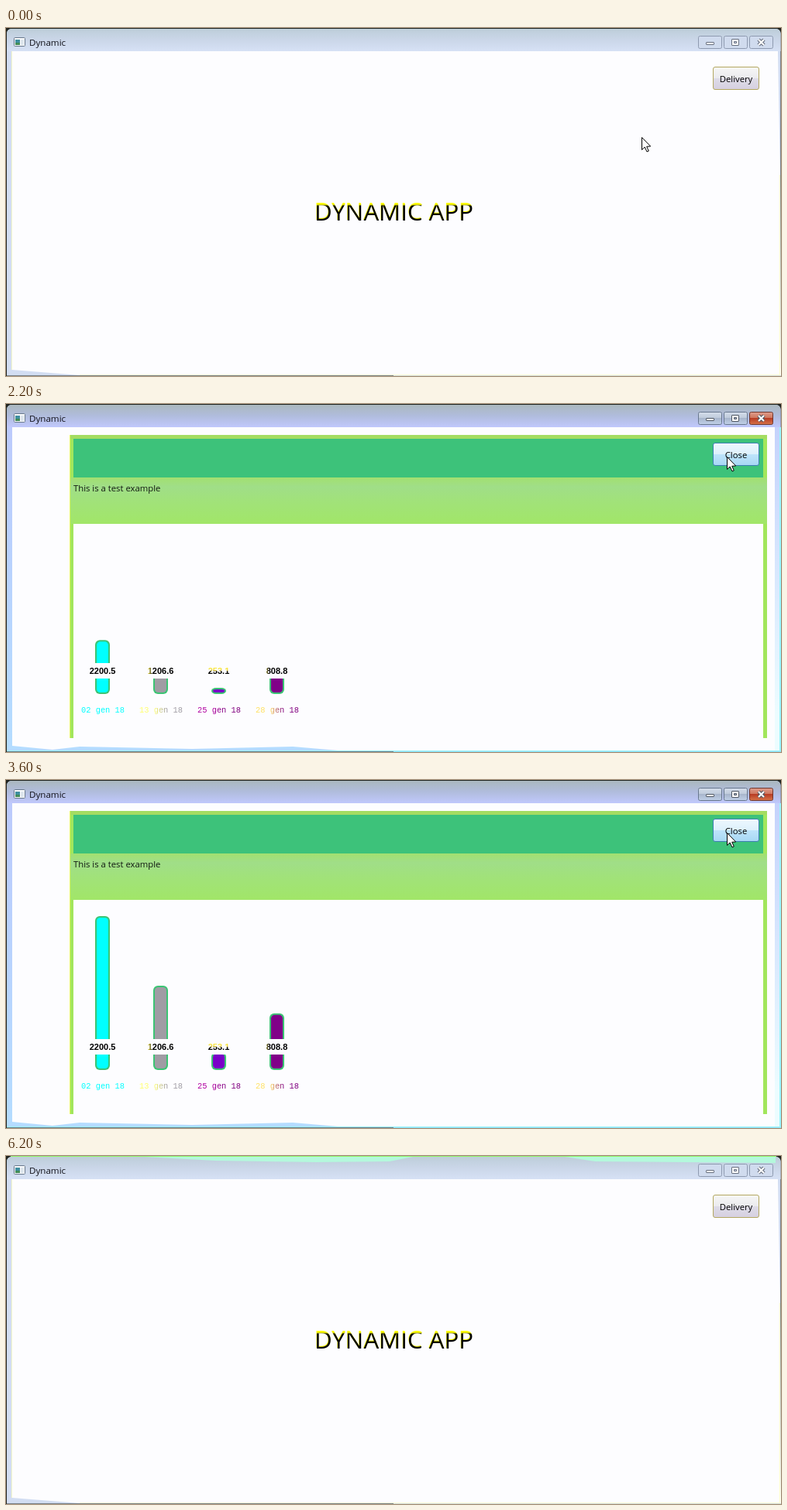
These frames come from a looping animation (1000 by 450 pixels, 6.57 s). An HTML page with a canvas:

```html
<!DOCTYPE html>
<html lang="en">
<head>
<meta charset="utf-8">
<title>Dynamic</title>
<style>
html, body { margin: 0; width: 100%; height: 100%; overflow: hidden; background: #fdfdff; }
canvas { display: block; width: 1000px; height: 450px; }
</style>
</head>
<body>
<canvas id="stage" width="1000" height="450"></canvas>
<script>
const ctx = document.getElementById('stage').getContext('2d');
const LOOP = 6570;
const UI = '"Open Sans", "Noto Sans", sans-serif';
const WHITE = '#fdfdff';
const PANEL = { left: 82, right: 982, top: 40, bottom: 432 };
const BAR_BASE = 375;
const BARS = [
  { value: 2200.5, date: '02 gen 18', early: ['#7444b0', '#fff4a0'], fill: '#00ffff', ink: ['#00ffff', '#00ffff'] },
  { value: 1206.6, date: '13 gen 18', early: ['#84ecb4', '#a0f0f4'], fill: '#a09ca4', ink: ['#ffff70', '#a09ca4'] },
  { value: 253.1, date: '25 gen 18', early: ['#70502c', '#70502c'], fill: '#7a00c8', ink: ['#b000a0', '#800080'] },
  { value: 808.8, date: '28 gen 18', early: ['#000080', '#202050'], fill: '#800088', ink: ['#ffe060', '#800080'] }
];

const clamp = x => Math.max(0, Math.min(1, x));

function rect(x, y, w, h, fill) {
  ctx.fillStyle = fill;
  ctx.fillRect(x, y, w, h);
}

function paint(fill, line) {
  ctx.fillStyle = fill;
  ctx.fill();
  if (!line) return;
  ctx.strokeStyle = line;
  ctx.lineWidth = 1;
  ctx.stroke();
}

function round(x, y, w, h, r, fill, line) {
  ctx.beginPath();
  ctx.roundRect(x, y, w, h, r);
  paint(fill, line);
}

function poly(points, fill, line) {
  ctx.beginPath();
  points.forEach(([x, y]) => ctx.lineTo(x, y));
  ctx.closePath();
  paint(fill, line);
}

function text(str, x, y, font, fill, align = 'left') {
  ctx.font = font;
  ctx.textAlign = align;
  ctx.fillStyle = fill;
  ctx.fillText(str, x, y);
}

function gradient(x0, y0, x1, y1, ...stops) {
  const g = ctx.createLinearGradient(x0, y0, x1, y1);
  stops.forEach(([at, color]) => g.addColorStop(at, color));
  return g;
}

function drawFrame(active, glow) {
  rect(0, 0, 1000, 450, '#20241f');
  rect(500, 440, 500, 10, active ? '#70e8f0' : '#d8dccc');
  round(1, 1, 998.5, 448.5, [6, 6, 0, 0], active
    ? gradient(0, 30, 0, 442, [0, '#bccafc'], [1, '#b4dcff'])
    : '#d2ddf2');
  round(1, 1, 998.5, 29, [6, 6, 0, 0], active
    ? gradient(0, 0, 0, 30, [0, '#aab8bc'], [0.5, '#b0bcdc'], [1, '#c0c8fc'])
    : gradient(0, 0, 0, 30, [0, '#bccdd8'], [0.5, '#cad6e8'], [1, '#d6e1f5']));
  if (glow) {
    const tint = active ? '#b4f890' : '#b4f8dc';
    poly([[160, 0], [270, 6], [400, 8], [495, 7], [530, 0]], tint);
    poly([[715, 0], [760, 7], [993, 9], [993, 0]], tint);
    rect(6, 0, 988, 1, '#90f468');
  }
  rect(8, 30, 984, 412, WHITE);
  if (active) {
    rect(992, 30, 7, 419, gradient(0, 30, 0, 400, [0, '#c4d2fc'], [1, '#ecfcff']));
    poly([[8, 442], [60, 447], [95, 443], [240, 446], [370, 443], [440, 449], [992, 449], [992, 440], [8, 440]], WHITE);
    rect(998, 30, 2, 419, '#98f4fc');
    rect(1, 448, 998, 1, '#a0f4fa');
  } else {
    poly([[992, 30], [996, 30], [999, 190], [1000, 449], [95, 449], [8, 442], [8, 430], [992, 430]], WHITE);
    rect(998, 190, 1, 259, '#ffffc8');
    rect(95, 448, 904, 1, '#ffffd8');
    rect(7, 30, 1, 412, '#f4f8c8');
  }
}

function drawCaption(active) {
  round(10.5, 12.5, 14, 11, 1, '#f8fafc', '#68788c');
  rect(12, 15, 6, 7, '#3f8fa0');
  rect(12, 19, 6, 3, '#448c58');
  rect(19, 15, 4, 7, '#dce4ec');
  text('Dynamic', 30, 23, '11.6px ' + UI, '#101018');

  const line = active ? '#68788e' : '#8e9ab0';
  const glyph = active ? '#505864' : '#687080';
  const plain = active
    ? gradient(0, 10, 0, 27, [0, '#d6dfec'], [0.45, '#c0ccdc'], [0.5, '#a8b6cc'], [1, '#c2d2ea'])
    : '#d0dbee';
  const red = gradient(0, 10, 0, 27, [0, '#e0a090'], [0.45, '#d07860'], [0.5, '#b83c24'], [1, '#d8784c']);
  round(893.5, 10.5, 30, 16, 2, plain, line);
  round(926.5, 10.5, 30, 16, 2, plain, line);
  round(959.5, 10.5, 30, 16, 2, active ? red : plain, active ? '#70382e' : line);
  round(903.5, 18.5, 10, 3, 0.5, '#ffffff', glyph);
  round(936.5, 14.5, 9, 8, 0.5, '#ffffff', glyph);
  round(939.5, 17.5, 3, 2, 0, plain, glyph);
  [[glyph, 4.5], ['#ffffff', 2.2]].forEach(([color, width]) => {
    ctx.strokeStyle = color;
    ctx.lineWidth = width;
    ctx.beginPath();
    ctx.moveTo(971, 15); ctx.lineTo(978, 22);
    ctx.moveTo(978, 15); ctx.lineTo(971, 22);
    ctx.stroke();
  });
}

function drawHeading() {
  const font = '31.2px ' + UI;
  text('DYNAMIC APP', 500, 248.4, font, '#ffff00', 'center');
  text('DYNAMIC APP', 500.5, 249, font,
    gradient(0, 226, 0, 249, [0, '#ffff00'], [0.1, '#f0f000'], [0.18, '#000000']), 'center');
}

function drawBar(bar, i, grow, early) {
  const mid = 124.5 + 75 * i;
  const h = 199 * bar.value / BARS[0].value * grow;
  const top = BAR_BASE - h;
  const corner = (r, height) => ({ x: r, y: Math.min(r, height / 2) });
  round(mid - 9.5, top, 19, h, corner(6, h), '#3cc474');
  if (h > 4) round(mid - 7.5, top + 2, 15, h - 4, corner(4.5, h - 4), early ? bar.early[0] : bar.fill);
  rect(mid - 27, 335, 54, 20, WHITE);

  let ink = '#000000';
  if (i === 2) ink = gradient(0, 341, 0, 349, [0, '#ffee40'], [0.45, '#e8d040'], [0.6, '#000000']);
  else if (i) ink = gradient(mid - 17, 0, mid - 10, 0, [0, '#ffee40'], [1, '#000000']);
  text(bar.value.toFixed(1), mid, 349, 'bold 11px "Liberation Sans", Arial, sans-serif', ink, 'center');

  const [from, to] = early ? [bar.early[1], bar.early[1]] : bar.ink;
  text(bar.date, mid + 0.5, 399, '10.4px "Liberation Mono", monospace',
    gradient(mid - 28, 0, mid + 28, 0, [0.35, from], [0.65, to]), 'center');
}

function drawPanel(open, grow, early) {
  if (open <= 0) return;
  const { left, right, top, bottom } = PANEL;
  const moving = open < 1;
  ctx.save();
  ctx.translate(right, 0);
  ctx.scale(open, 1);
  ctx.translate(-right, 0);
  rect(left, top, right - left, bottom - top, moving ? '#f4f8a8' : '#a2e65c');
  rect(left, 95, right - left, 60, gradient(0, 95, 0, 155,
    [0, '#a2e070'], [0.2, '#a0de88'], [0.5, '#a1e27a'], [1, '#a1e668']));
  rect(left, top, right - left, 5, '#a4dc62');
  rect(left + 5, 45, 890, 50, '#3dc27a');
  rect(left + 5, 155, 890, 277, WHITE);
  text('This is a test example', 87, 113, '11.3px ' + UI, '#101810');
  BARS.forEach((bar, i) => drawBar(bar, i, grow, early));
  ctx.restore();
  rect(Math.round(right - (right - left) * open), top, 1, bottom - top, moving ? '#ffff80' : '#e4f860');
}

const BUTTON = {
  normal: [['#f6f6f6', '#ebebee', '#dedce8', '#d6d0e0'], '#b4a860'],
  off: [['#f8f8f8', '#f8f8f8', '#f8f8f8', '#f8f8f8'], '#b8d0c4'],
  waking: [['#f2f4f4', '#e8ecf0', '#d8dcea', '#ccd8f0'], '#6c8898'],
  hover: [['#eef8fe', '#dcf0fc', '#bee4fb', '#a8d8f4'], '#3c7fb1'],
  pressed: [['#d8ecf8', '#c8e4f8', '#9cd0f0', '#88c4ec'], '#2c628b']
};

function drawButton(label, look) {
  const [[a, b, c, d], line] = BUTTON[look];
  round(912.5, 50.5, 59, 29, 2.5, gradient(0, 51, 0, 79, [0, a], [0.5, b], [0.5, c], [1, d]), line);
  if (look === 'pressed') {
    rect(914, 51, 56, 1, '#7896b0');
    rect(913, 52, 1, 26, '#7896b0');
  }
  text(label, 942, 70, '11.3px ' + UI, look === 'off' ? '#90908c' : '#000000', 'center');
}

function drawCursor(x, y) {
  const arrow = [[0, 0], [0, 16], [3.7, 12.5], [6.5, 18.5], [8.8, 17.5], [6.2, 11.8], [11.2, 11.5]];
  poly(arrow.map(([dx, dy]) => [x + 0.5 + dx, y + 0.5 + dy]), '#ffffff', '#000000');
}

// The screen refreshes every 200 ms, the last tick of each second 30 ms late.
function tick(t) {
  const rest = t % 1000;
  return t - rest + 200 * (rest < 830 ? Math.min(3, Math.floor(rest / 200)) : 4);
}

function buttonState(t) {
  if (t < 400 || t >= 6200) return ['Delivery', 'normal'];
  if (t < 600) return ['Delivery', 'hover'];
  if (t < 1525) return ['Delivery', 'off'];
  if (t < 1800) return ['Close', 'waking'];
  if (t < 4800) return ['Close', 'hover'];
  if (t < 5000) return ['Close', 'pressed'];
  if (t < 5800) return ['Close', 'off'];
  return ['Delivery', 'hover'];
}

function render(ms) {
  const t = tick(ms % LOOP);
  const opening = t >= 600 && t < 1525;
  const left = t >= 6200;
  const active = t >= 600 && !left;
  const open = t < 4800 ? clamp((t - 525) / 1000) : clamp((5800 - t) / 1000);
  const grow = opening ? 1 : clamp((t - 1500) / 2000);

  drawFrame(active, opening || left);
  drawCaption(active);
  drawHeading();
  drawPanel(open, grow, opening);
  drawButton(...buttonState(t));
  if (!left) {
    const move = clamp(t / 400);
    drawCursor(Math.round(820 + 110 * move), Math.round(141 - 73 * move));
  }
}

let start;
function loop(now) {
  start ??= now;
  render(now - start);
  requestAnimationFrame(loop);
}
render(0);
requestAnimationFrame(loop);
</script>
</body>
</html>
```
